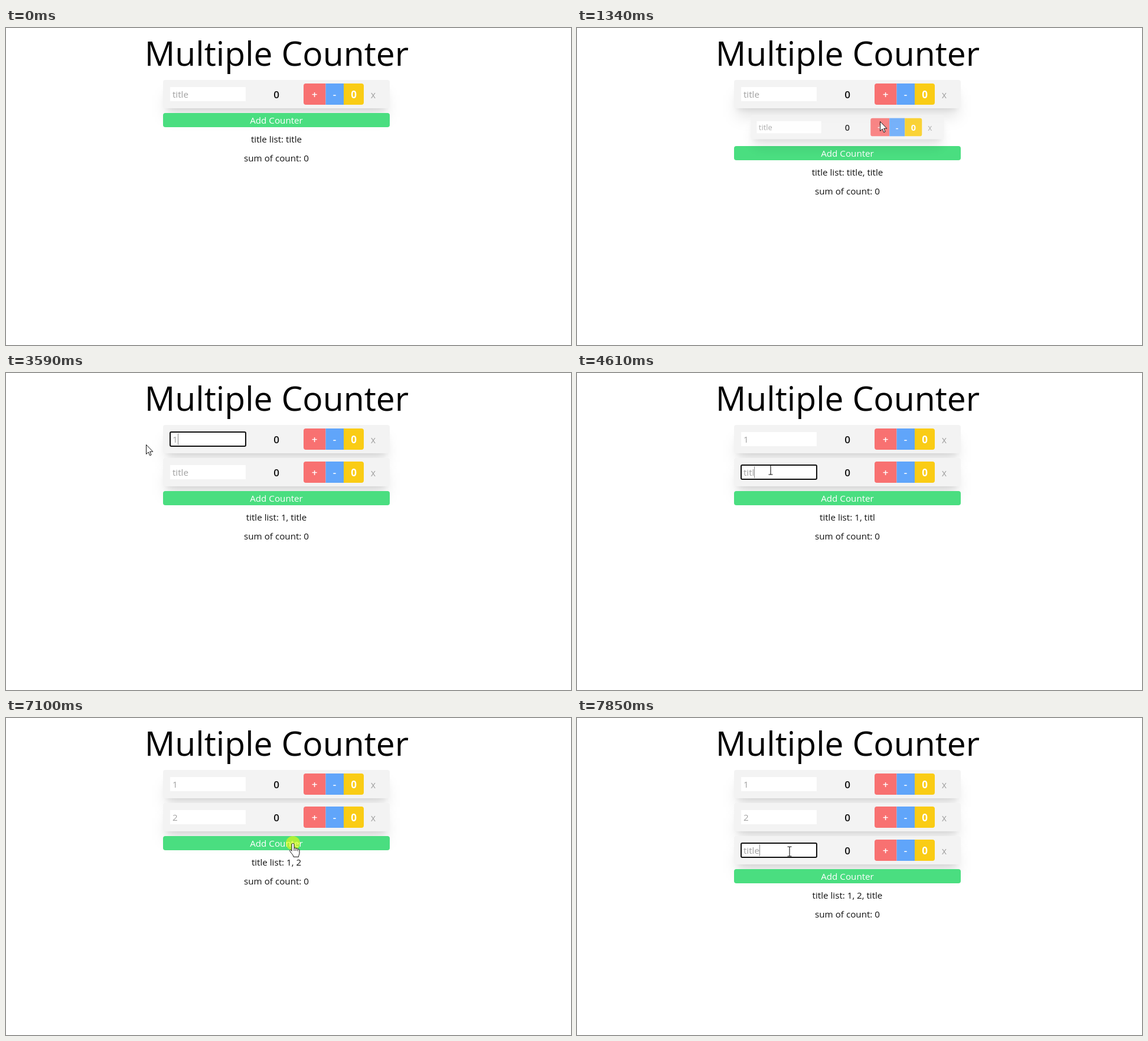
An HTML page for the animation above (8000 ms loop, 957 by 537 pixels).

```html
<!DOCTYPE html>
<html lang="en">
<head>
<meta charset="utf-8">
<title>Multiple Counter</title>
<style>
  html, body { margin: 0; width: 100%; height: 100%; overflow: hidden; background: #fff; }
  svg { display: block; width: 957px; height: 537px; }
  text { font-family: "Open Sans", "Noto Sans", sans-serif; font-size: 15.2px; white-space: pre; }
  .mid { text-anchor: middle; }
  .big { font-size: 17px; font-weight: 600; }
  .bold { font-weight: 700; }
  .cursor path { stroke-linejoin: round; }
</style>
</head>
<body>
<svg id="stage" viewBox="0 0 957 537">
  <defs>
    <filter id="soft" x="-20%" y="-150%" width="140%" height="400%"><feGaussianBlur stdDeviation="12.5"/></filter>
    <filter id="near" x="-10%" y="-80%" width="120%" height="260%"><feGaussianBlur stdDeviation="5"/></filter>
  </defs>
  <text class="mid" x="458.5" y="64" style="font-size:57px">Multiple Counter</text>
  <g id="footer">
    <rect x="266" width="384" height="24" rx="4" fill="#4ade80"/>
    <text class="mid" x="458" y="18" fill="#fff">Add Counter</text>
    <text id="list" class="mid" x="458" y="50" fill="#111"></text>
    <text class="mid" x="458" y="82" fill="#111">sum of count: 0</text>
  </g>
  <g id="pointer">
    <circle id="press" r="12" fill="#ff0" fill-opacity=".55"/>
    <g class="cursor" id="arrow">
      <path d="M.5.5V16.5L4.2 13 6.7 18.7 9.1 17.7 6.7 12.2H11.8Z" fill="#fff" stroke="#111"/>
    </g>
    <g class="cursor" id="beam">
      <path d="M-3.5-8H-1Q0-8 0-7Q0-8 1-8H3.5M0-7V7M-3.5 8H-1Q0 8 0 7Q0 8 1 8H3.5" fill="none" stroke="#111" stroke-width="1.1"/>
    </g>
    <g class="cursor" id="hand">
      <path d="M-2 2C-2 0 2 0 2 2V8.5C3 7.6 5 8 5 9.3C6.2 8.5 8 9 8 10.3C9.3 9.7 11 10.3 11 12V17C11 19.5 9.5 20.5 9.5 23.3H1C1 20.5-3 17-5 13.7C-6.3 11.5-4 10.6-3 12L-2 13.3Z" fill="#fff" stroke="#111"/>
      <path d="M2 8.5V13M5 9.5V13M8 10.5V13.5" fill="none" stroke="#111"/>
    </g>
  </g>
</svg>
<script>
const LOOP = 8000, GROW = 400, STEP = 56;
const $ = id => document.getElementById(id);
const stage = $('stage'), footer = $('footer'), pointer = $('pointer');

// Each track is a list of [start, value] that holds until the next start.
const born = [-GROW, 1152, 7170];
const titles = [
  [[0, 'title'], [3190, '1']],
  [[0, 'title'], [4610, 'titl'], [5150, 'ti'], [5220, ''], [5410, '2']],
  [[0, 'title']]
];
const focus = [[0, -1], [2380, 0], [4070, 1], [7030, -1], [7630, 2]];
const caretOn = [[0, true], [2520, false], [3190, true], [3690, false], [4070, true], [6080, false], [6550, true]];
const shapes = [
  [0, ''], [260, 'arrow'], [860, 'hand'], [1220, 'arrow'], [2240, 'beam'], [2790, 'arrow'],
  [3890, 'beam'], [6740, 'arrow'], [6960, 'hand'], [7240, 'arrow'], [7560, 'beam']
];
const presses = [[1150, 1220], [2380, 2720], [4070, 4200], [7030, 7170], [7630, 7780]];
const path = [
  [260, 878, 474], [640, 690, 250], [860, 600, 112], [1020, 552, 149], [1150, 552, 149],
  [1340, 513, 158], [1890, 513, 158], [2380, 345, 111], [2450, 345, 111], [2720, 229, 102],
  [2790, 224, 114], [3520, 224, 114], [3590, 237, 121], [4140, 328, 164], [6080, 328, 164],
  [6220, 337, 167], [6550, 337, 167], [7030, 486, 212], [7170, 486, 212], [7630, 360, 226]
];
const selection = [2450, 3190];

const at = (track, t) => track.findLast(([start]) => start <= t)[1];
const clamp = (v, lo, hi) => Math.min(hi, Math.max(lo, v));
const show = (el, on) => el.setAttribute('visibility', on ? 'visible' : 'hidden');
const set = (el, attrs) => { for (const k in attrs) el.setAttribute(k, attrs[k]); };

const label = (x, s, cls, fill) =>
  `<text class="mid ${cls}" x="${x}" y="7" fill="${fill}">${s}</text>`;

function makeRow() {
  const g = document.createElementNS(stage.namespaceURI, 'g');
  g.innerHTML = `
    <rect x="-187" y="1" width="374" height="38" rx="4" fill-opacity=".1" filter="url(#soft)"/>
    <rect x="-186" y="-10" width="372" height="36" rx="4" fill-opacity=".1" filter="url(#near)"/>
    <rect x="-192" y="-24" width="384" height="48" rx="4" fill="#f3f3f3"/>
    <rect class="field" x="-180" y="-12" width="128" height="24" fill="#fff"/>
    <rect class="mark" y="-10" height="21" fill="#3390ff"/>
    <text class="name" x="-176" y="6"></text>
    <rect class="caret" y="-10" width="1" height="20" fill="#888"/>
    <path d="M83.5-18H50Q46-18 46-14V14Q46 18 50 18H83.5Z" fill="#f87171"/>
    <path d="M83.5-18H114V18H83.5Z" fill="#60a5fa"/>
    <path d="M114-18H144Q148-18 148-14V14Q148 18 144 18H114Z" fill="#facc15"/>
    ${label(0, '0', 'big', '#111')}
    ${label(64.5, '+', 'big', '#fff')}
    ${label(98.5, '-', 'big', '#fff')}
    ${label(131, '0', 'big bold', '#fff')}
    <text class="mid" x="164" y="7" fill="#a3a3a3" style="font-size:16px">x</text>`;
  stage.insertBefore(g, footer);
  const part = name => g.querySelector('.' + name);
  return { g, field: part('field'), mark: part('mark'), name: part('name'), caret: part('caret'), above: false };
}
const rows = born.map(makeRow);

function pointerAt(t) {
  const i = path.findLastIndex(p => p[0] <= t);
  if (i < 0) return path[0].slice(1);
  const [t0, x0, y0] = path[i], [t1, x1, y1] = path[i + 1] || [LOOP, x0, y0];
  const k = (t - t0) / (t1 - t0), e = k * k * (3 - 2 * k);
  return [x0 + (x1 - x0) * e, y0 + (y1 - y0) * e];
}

function drawRow(row, i, t, mouseX) {
  const age = t - born[i], alive = age >= 0;
  row.g.style.display = alive ? '' : 'none';
  if (!alive) return;

  // A row grows in with a cubic ease-out, lying above the button meanwhile.
  const scale = 1 - (1 - clamp(age / GROW, 0, 1)) ** 3;
  set(row.g, { transform: `translate(458 ${112 + STEP * i}) scale(${scale})`, opacity: scale });
  const above = scale < 1;
  if (above !== row.above) {
    stage.insertBefore(row.g, above ? pointer : footer);
    row.above = above;
  }

  const focused = at(focus, t) === i;
  set(row.field, focused
    ? { stroke: '#101010', 'stroke-width': 2, rx: 2 }
    : { stroke: 'none', rx: 0 });

  row.name.textContent = at(titles[i], t);
  const width = row.name.getComputedTextLength();
  const from = clamp(mouseX - 458, -176, width - 176);
  const marked = i === 0 && t >= selection[0] && t < selection[1] && from < width - 176;
  set(row.mark, { x: from, width: width - 176 - from });
  row.mark.style.display = marked ? '' : 'none';
  row.name.setAttribute('fill', marked ? '#fff' : '#a0a0a0');
  row.caret.setAttribute('x', Math.round(width - 176));
  row.caret.style.display = focused && at(caretOn, t) ? '' : 'none';
}

function draw(t) {
  const [x, y] = pointerAt(t);
  rows.forEach((row, i) => drawRow(row, i, t, x));

  const names = titles.filter((_, i) => t >= born[i]).map(track => at(track, t));
  $('list').textContent = 'title list: ' + names.join(', ');
  footer.setAttribute('transform', `translate(0 ${88 + STEP * names.length})`);

  pointer.setAttribute('transform', `translate(${Math.round(x)} ${Math.round(y)})`);
  const shape = at(shapes, t);
  for (const id of ['arrow', 'beam', 'hand']) show($(id), id === shape);
  show($('press'), presses.some(([a, b]) => t >= a && t < b));
}

const begin = performance.now();
function tick() {
  draw((performance.now() - begin) % LOOP);
  requestAnimationFrame(tick);
}
tick();
</script>
</body>
</html>
```
